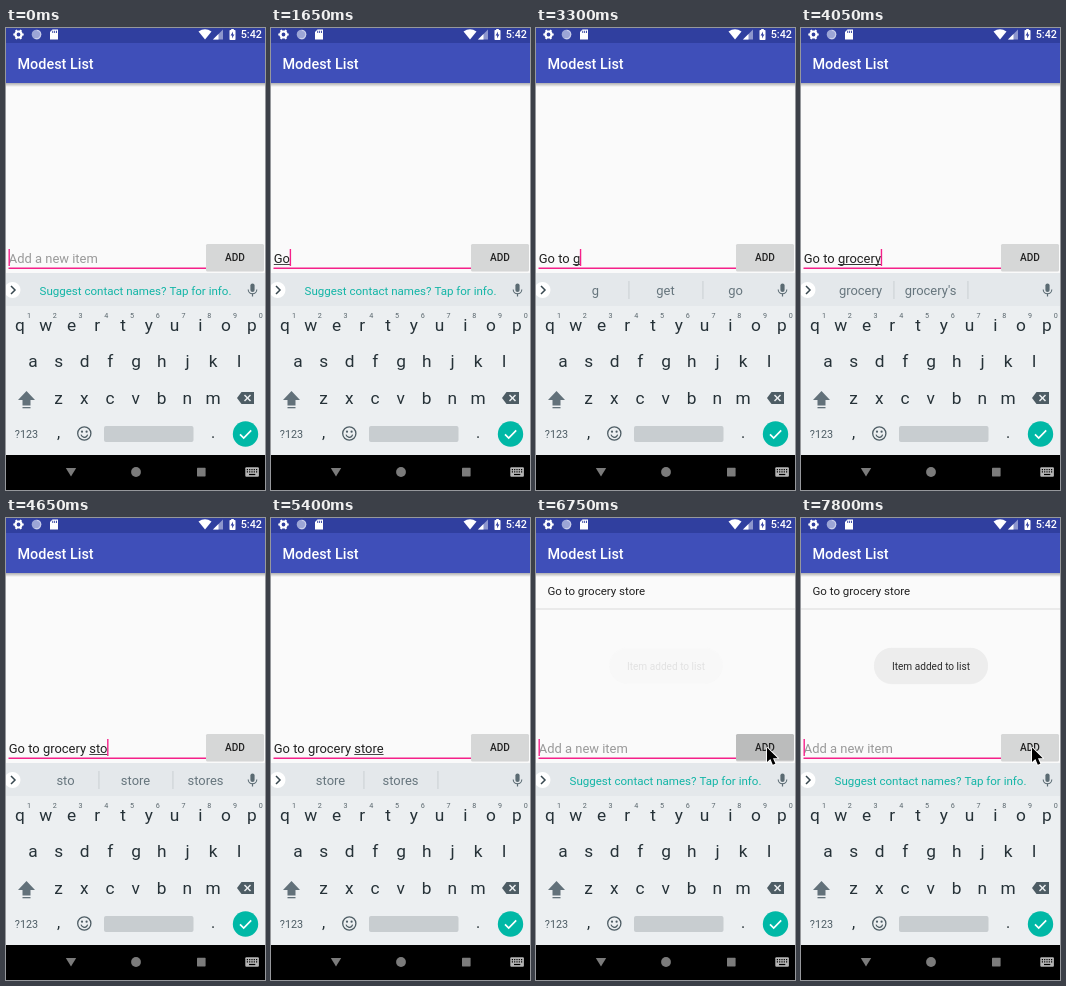
An HTML page with a canvas for the animation above (8 s loop, 259 by 462 pixels).

```html
<!DOCTYPE html>
<html lang="en">
<head>
<meta charset="utf-8">
<title>Todo list demo</title>
<style>
html, body { margin: 0; width: 100%; height: 100%; overflow: hidden; background: #fafafa; }
canvas { display: block; width: 259px; height: 462px; }
</style>
</head>
<body>
<canvas id="stage"></canvas>
<script>
const W = 259, H = 462, LOOP = 8000;
const PINK = '#f5218a', TEAL = '#12b5a6', KEY = '#263238', ICON = '#5b6b73';
const canvas = document.getElementById('stage');
const ctx = canvas.getContext('2d');
const ratio = window.devicePixelRatio || 1;
canvas.width = W * ratio;
canvas.height = H * ratio;

// Each step: start time, typed text, caret visible, suggestions (none = prompt)
const steps = [
  [0, '', 1], [300, '', 0], [750, '', 1], [1200, '', 0],
  [1350, 'G', 1], [1650, 'Go', 1],
  [1950, 'Go t', 1, 't', 'to', 'the'],
  [2100, 'Go to', 1, 'to', 'too', 'today'],
  [2400, 'Go to ', 1, 'the', 'get', 'bed'],
  [2850, 'Go to ', 0, 'the', 'get', 'bed'],
  [3300, 'Go to g', 1, 'g', 'get', 'go'],
  [3450, 'Go to gr', 1, 'gr', 'great', 'grab'],
  [3600, 'Go to gro', 1, 'gro', 'grocery', 'groceries'],
  [3900, 'Go to groce', 1, 'groce', 'grocery', 'groceries'],
  [4050, 'Go to grocery', 1, 'grocery', "grocery's", ''],
  [4200, 'Go to grocery ', 1, 'store', 'shopping', 'stores'],
  [4350, 'Go to grocery s', 1, 's', 'store', 'stores'],
  [4500, 'Go to grocery st', 1, 'st', 'store', 'stores'],
  [4650, 'Go to grocery sto', 1, 'sto', 'store', 'stores'],
  [4800, 'Go to grocery stor', 1, 'stor', 'store', 'stores'],
  [4950, 'Go to grocery store', 1, 'store', 'stores', ''],
  [5400, 'Go to grocery store', 0, 'store', 'stores', ''],
  [5850, 'Go to grocery store', 1, 'store', 'stores', ''],
  [6600, '', 1], [7200, '', 0], [7800, '', 1]
];

// Value of the last [time, value] pair already reached
const stepped = (t, pairs) => pairs.filter(p => p[0] <= t).pop()[1];

function rect(x, y, w, h, color, r = 0) {
  ctx.fillStyle = color;
  ctx.beginPath();
  ctx.roundRect(x, y, w, h, r);
  ctx.fill();
}

function disc(x, y, r, color) {
  ctx.fillStyle = color;
  ctx.beginPath();
  ctx.arc(x, y, r, 0, Math.PI * 2);
  ctx.fill();
}

function ring(x, y, r, color, width, from = 0, to = Math.PI * 2) {
  ctx.strokeStyle = color;
  ctx.lineWidth = width;
  ctx.beginPath();
  ctx.arc(x, y, r, from, to);
  ctx.stroke();
}

function trace(points) {
  ctx.beginPath();
  for (let i = 0; i < points.length; i += 2) ctx.lineTo(points[i], points[i + 1]);
}

function poly(color, ...points) {
  ctx.fillStyle = color;
  trace(points);
  ctx.closePath();
  ctx.fill();
}

function line(color, width, ...points) {
  ctx.strokeStyle = color;
  ctx.lineWidth = width;
  trace(points);
  ctx.stroke();
}

function text(str, x, y, size, color, align = 'left', weight = 400) {
  ctx.font = `${weight} ${size}px Roboto, sans-serif`;
  ctx.textAlign = align;
  ctx.fillStyle = color;
  ctx.fillText(str, x, y);
  return ctx.measureText(str).width;
}

function drawHeader() {
  const shadow = ctx.createLinearGradient(0, 55, 0, 59);
  shadow.addColorStop(0, 'rgba(0,0,0,.3)');
  shadow.addColorStop(1, 'rgba(0,0,0,0)');
  rect(0, 55, W, 4, shadow);
  rect(0, 0, W, 15, '#303f9f');
  rect(0, 15, W, 40, '#3f4fb9');
  text('Modest List', 11.5, 41, 14.4, '#fff', 'left', 500);

  // Gear, sync disc, memory card
  ring(12.5, 6.5, 3, '#fff', 2.2);
  for (let i = 0; i < 6; i++) {
    const a = i * Math.PI / 3, c = Math.cos(a), s = Math.sin(a);
    line('#fff', 2, 12.5 + 3 * c, 6.5 + 3 * s, 12.5 + 5.2 * c, 6.5 + 5.2 * s);
  }
  disc(30.5, 6.5, 4.8, '#9ca5d6');
  ring(30.5, 6.5, 4.2, '#c8cdea', 1.2, -1.5, 2);
  poly('#fff', 46.5, 1.5, 52, 1.5, 52, 11.5, 44, 11.5, 44, 4);
  for (const x of [46.3, 48.2, 50.1]) rect(x, 2.7, 0.9, 2.2, '#303f9f');

  // Wi-Fi, signal, battery, clock
  ctx.fillStyle = '#fff';
  ctx.beginPath();
  ctx.moveTo(199, 11.5);
  ctx.lineTo(192.5, 3.5);
  ctx.quadraticCurveTo(199, -1, 205.5, 3.5);
  ctx.fill();
  poly('#8d96cd', 207, 11.5, 217, 11.5, 217, 1.5);
  poly('#fff', 207, 11.5, 212.5, 11.5, 212.5, 6);
  rect(223.5, 2, 6, 10, '#fff', 0.7);
  rect(225.2, 1, 2.6, 1.5, '#fff');
  poly('#303f9f', 227, 3.6, 224.6, 7.5, 226.2, 7.5, 226, 10.4, 228.4, 6.5, 226.9, 6.5);
  text('5:42', 256, 10.3, 10.8, '#fff', 'right', 500);
}

function drawInput(typed, caret, buttonColor) {
  const x = 2.8, base = 234.5;
  let width = 0;
  if (typed) {
    width = text(typed, x, base, 12.95, '#212121');
    const word = typed.split(' ').pop();
    const wordWidth = ctx.measureText(word).width;
    if (word) rect(x + width - wordWidth, 236, wordWidth, 0.9, '#333');
  } else {
    text('Add a new item', x, base, 12.95, '#999');
  }
  rect(2.5, 239.4, 197.5, 1.5, PINK);
  if (caret) rect(x + width - 0.3, 221, 1.4, 17, PINK);

  rect(200, 216.6, 58, 27, 'rgba(0,0,0,.15)', 1.5);
  rect(200, 216, 58, 26.6, buttonColor, 1.5);
  text('ADD', 229, 232.8, 10.1, '#222', 'center', 500);
}

function drawStrip(words) {
  rect(0, 245, W, 33, '#e4e8eb');
  disc(6.5, 262, 8, '#fff');
  line('#37474f', 1.5, 5, 258, 9, 262, 5, 266);
  if (words.length) {
    words.forEach((word, i) => text(word, 59.5 + i * 70, 267, 12.95, '#66757d', 'center'));
    for (const x of [92.5, 166.5]) rect(x, 253, 0.9, 18, '#c6cccf');
  } else {
    text('Suggest contact names? Tap for info.', 129.5, 266.5, 11.55, TEAL, 'center');
  }
  rect(244.4, 255.5, 4.2, 8.5, ICON, 2.1);
  ring(246.5, 261.5, 4.3, ICON, 1.1, 0, Math.PI);
  line(ICON, 1.2, 246.5, 265.5, 246.5, 268.5);
}

function drawKeyRow(letters, x, y) {
  [...letters].forEach((letter, i) => text(letter, x + i * 25.75, y, 17.3, KEY, 'center'));
}

function drawKeyboard() {
  rect(0, 278, W, 149, '#eceff1');
  drawKeyRow('qwertyuiop', 14, 302.5);
  drawKeyRow('asdfghjkl', 27, 339);
  drawKeyRow('zxcvbnm', 52.5, 375.8);
  [...'1234567890'].forEach((digit, i) =>
    text(digit, 23 + i * 25.75, 290, 7.2, '#59666d', 'center'));

  // Shift and delete
  poly('#62717a', 20.5, 363, 29, 372, 24.5, 372, 24.5, 377.5, 16.5, 377.5, 16.5, 372, 12, 372);
  rect(16.5, 379, 8, 1.3, '#62717a');
  poly('#4d5c64', 231, 370, 235.5, 364, 248, 364, 248, 376, 235.5, 376);
  line('#eceff1', 1.5, 238.5, 367, 244.5, 373);
  line('#eceff1', 1.5, 244.5, 367, 238.5, 373);

  // Bottom row
  text('?123', 20.5, 409.7, 10.8, '#4d5c64', 'center');
  text(',', 52.5, 410, 16, KEY, 'center');
  text('.', 207, 410, 16, KEY, 'center');
  ring(78.3, 405.5, 6.6, '#4d5c64', 1.3);
  disc(76, 403.7, 1.1, '#4d5c64');
  disc(80.6, 403.7, 1.1, '#4d5c64');
  ring(78.3, 405.8, 3.4, '#4d5c64', 1.2, 0.25, Math.PI - 0.25);
  rect(98, 398, 89.5, 16, '#c8cdd0', 2);
  disc(239.5, 406, 12.7, '#00b8a6');
  line('#fff', 1.7, 234, 406.3, 237.7, 410, 245.2, 402.3);
}

function drawNavBar() {
  const gray = '#7b7b7b';
  rect(0, 427, W, 35, '#000');
  poly(gray, 59.8, 440, 70.2, 440, 65, 448.6);
  disc(130, 444, 4.9, gray);
  rect(191, 439.8, 8.6, 8.6, gray, 0.6);
  rect(239.3, 439.3, 13.6, 9.4, '#b5b5b5', 1);
  for (let row = 0; row < 2; row++)
    for (let col = 0; col < 5; col++)
      rect(240.8 + col * 2.3, 441 + row * 2.3, 1.2, 1.2, '#000');
  rect(243, 445.9, 6.3, 1.2, '#000');
}

function drawToast(alpha) {
  ctx.globalAlpha = alpha;
  rect(73, 130.3, 114, 36, 'rgba(0,0,0,.04)', 18);
  rect(73, 129.7, 114, 36, '#ededed', 18);
  text('Item added to list', 130, 151.8, 10.1, '#2b2b2b', 'center');
  ctx.globalAlpha = 1;
}

function drawPointer() {
  const shape = [231, 229.5, 231, 244, 234.4, 241, 236.8, 246.8,
    239.4, 245.7, 237, 240.2, 241.8, 240.2];
  ctx.lineJoin = 'round';
  line('#fff', 1.8, ...shape, 231, 229.5);
  poly('#000', ...shape);
  ctx.lineJoin = 'miter';
}

function draw(t) {
  const [, typed, caret, ...words] = steps.filter(s => s[0] <= t).pop();
  const button = stepped(t, [[0, '#d6d7d7'], [6450, '#c6c7c7'], [6600, '#bbbcbc'],
    [6900, '#cbcccc'], [7050, '#d6d7d7']]);
  const toast = stepped(t, [[0, 0], [6750, 0.1], [6900, 0.6], [7050, 0.95], [7200, 1]]);

  ctx.setTransform(ratio, 0, 0, ratio, 0, 0);
  rect(0, 0, W, H, '#fafafa');
  if (t >= 6600) {
    text('Go to grocery store', 11.5, 77, 11.52, '#212121');
    rect(0, 90.5, W, 0.9, '#dcdcdc');
  }
  drawHeader();
  drawInput(typed, caret, button);
  drawStrip(words);
  drawKeyboard();
  drawNavBar();
  if (toast) drawToast(toast);
  if (t >= 6150) drawPointer();
}

const start = performance.now();
function tick() {
  draw((performance.now() - start) % LOOP);
  requestAnimationFrame(tick);
}
tick();
</script>
</body>
</html>
```
